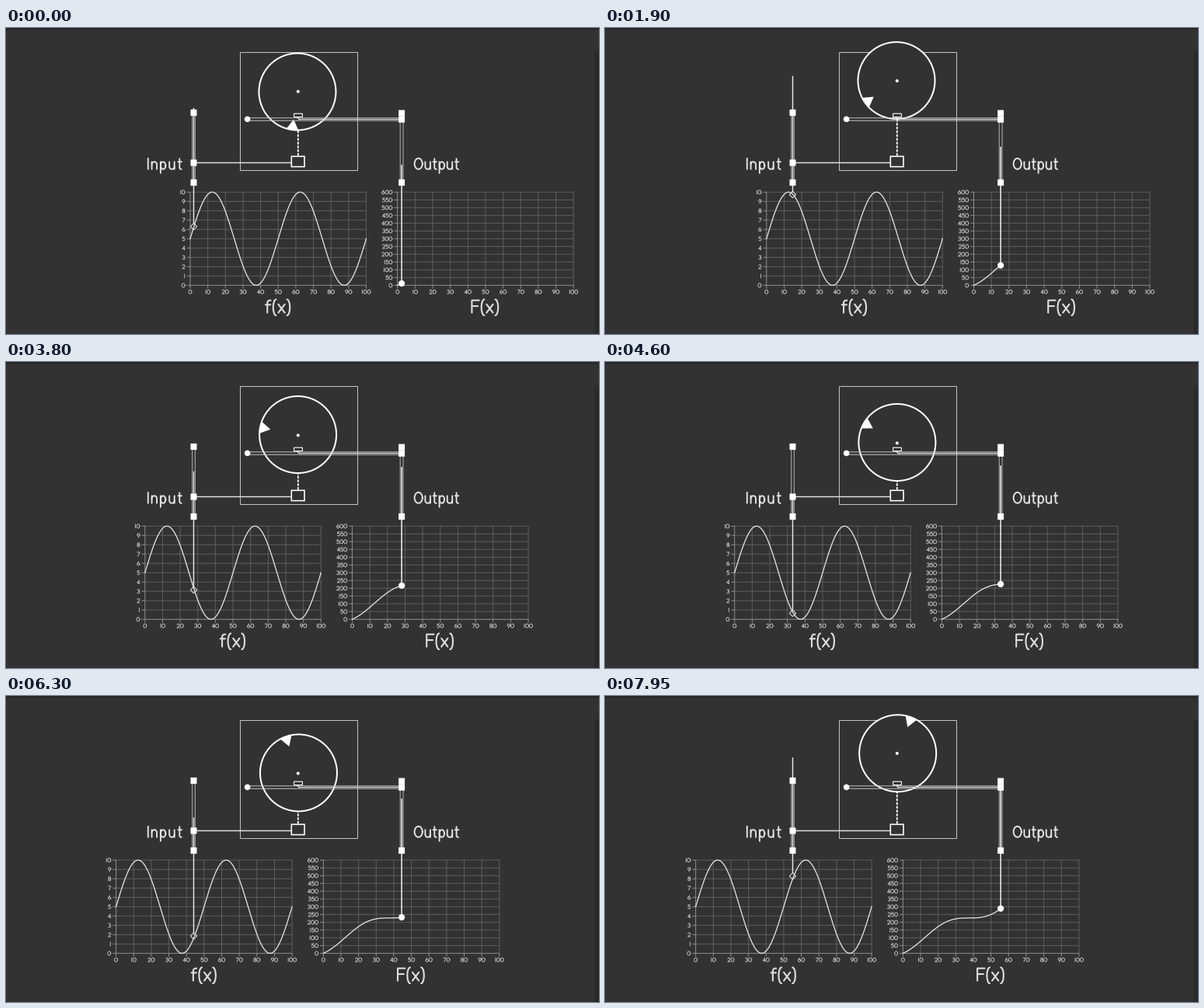
Recreate the animation shown at these times as a matplotlib script. Size 763 px wide and 394 px high, loop 8 s.

```python
import numpy as np
import matplotlib.pyplot as plt
from matplotlib.animation import FuncAnimation
from matplotlib.collections import LineCollection
from matplotlib.patches import Circle, Polygon, Rectangle
from matplotlib.transforms import Affine2D

W, H = 763, 394
PX = 0.72                      # one pixel in points at 100 dpi
BG = "#323232"
STEP = 50
FRAMES = 160

UNIT = 2.265                   # pixels per x unit
SPEED = 2.245                  # pixels the plots slide per x unit
TOP, BASE = 211.3, 331.3       # plot area
PEN_IN, PEN_OUT = 241.5, 509.1
IN_0, OUT_0 = 237.0, 503.7
ROD = 152
START_X = 2.1
HUB_X, RADIUS = 375.8, 49.5


# ---- single-stroke lettering, cap height 14 ----
def arc(cx, cy, rx, ry, a=0, b=360):
    t = np.radians(np.linspace(a, b, 20))
    return list(zip(cx + rx * np.cos(t), cy + ry * np.sin(t)))


GLYPHS = {
    "I": (0, [[(0, 0), (0, 14)]]),
    "n": (6.5, [[(0, 0), (0, 9.5)],
                arc(3.25, 6, 3.25, 3.5, 180, 0) + [(6.5, 0)]]),
    "p": (6.5, [[(0, 9.5), (0, -5)], arc(3.25, 4.75, 3.25, 4.75)]),
    "u": (6.5, [[(0, 9.5)] + arc(3.25, 3.5, 3.25, 3.5, 180, 360),
                [(6.5, 0), (6.5, 9.5)]]),
    "t": (4.5, [[(1.8, 13.5)] + arc(4, 2.2, 2.2, 2.2, 180, 275),
                [(0, 9.5), (4.5, 9.5)]]),
    "O": (10.2, [arc(5.1, 7, 5.1, 7)]),
    "f": (6, [[(2, 0)] + arc(5, 11, 3, 3, 180, 75), [(0, 9), (5.5, 9)]]),
    "x": (7.2, [[(0, 0), (7.2, 9.5)], [(0, 9.5), (7.2, 0)]]),
    "(": (3.2, [arc(3.2, 6, 3.2, 9, 90, 270)]),
    ")": (3.2, [arc(0, 6, 3.2, 9, 90, -90)]),
    "F": (8.2, [[(8.2, 14), (0, 14), (0, 0)], [(0, 7.5), (6.8, 7.5)]]),
    "0": (11, [arc(5.5, 7, 5.5, 7)]),
    "1": (3, [[(1.5, 0), (1.5, 14)]]),
    "2": (9, [arc(4.5, 9.8, 4.3, 4.2, 170, -35) + [(0, 0), (9, 0)]]),
    "3": (9, [arc(4.2, 10.6, 3.8, 3.4, 150, -90),
              arc(4.2, 3.7, 4.6, 3.6, 90, -150)]),
    "4": (9, [[(7, 0), (7, 14), (0, 4), (9, 4)]]),
    "5": (9, [[(8, 14), (1.5, 14)] + arc(4.3, 4.6, 4.6, 4.6, 135, -150)]),
    "6": (9, [arc(4.5, 4.4, 4.5, 4.4), [(0.6, 6.5), (5.5, 14)]]),
    "7": (9, [[(0, 14), (9, 14), (3, 0)]]),
    "8": (9, [arc(4.5, 10.6, 3.7, 3.4), arc(4.5, 3.7, 4.5, 3.6)]),
    "9": (9, [arc(4.5, 9.6, 4.5, 4.4), [(8.4, 7.5), (3.5, 0)]]),
}


def lettering(text, x, base, scale, gap, align=0.0):
    """Strokes for text; align 0 left, 0.5 centre, 1 right."""
    width = sum(GLYPHS[c][0] for c in text) + gap * (len(text) - 1)
    x -= align * width * scale
    strokes = []
    for c in text:
        w, lines = GLYPHS[c]
        strokes += [np.array(s) * (scale, -scale) + (x, base) for s in lines]
        x += (w + gap) * scale
    return strokes


# ---- stage ----
fig = plt.figure(figsize=(W / 100, H / 100), dpi=100, facecolor=BG)
ax = fig.add_axes([0, 0, 1, 1])
ax.set_xlim(0, W)
ax.set_ylim(H, 0)
ax.axis("off")

slide = Affine2D()
moving = slide + ax.transData


def strokes(lines, color, lw, z, scroll=False):
    c = LineCollection(lines, colors=color, linewidths=lw * PX, zorder=z,
                       capstyle="round", joinstyle="round", snap=False,
                       transform=moving if scroll else ax.transData)
    ax.add_collection(c, autolim=False)


def line(xs, ys, color, lw, z, **kw):
    return ax.plot(xs, ys, color=color, lw=lw * PX, zorder=z, snap=False,
                   scalex=False, scaley=False, **kw)[0]


def box(x0, y0, x1, y1, z, edge="none", fill="none", lw=0.0, snap=False):
    ax.add_patch(Rectangle((x0, y0), x1 - x0, y1 - y0, ec=edge, fc=fill,
                           lw=lw * PX, zorder=z, joinstyle="miter",
                           snap=snap))


def block(x, y):
    box(x - 4, y - 4.1, x + 4, y + 4.1, 12, fill="white")


def dot(x, y, r, z):
    return ax.add_patch(Circle((x, y), r, fc="white", ec="none", zorder=z))


# ---- functions ----
def f(x):
    return 5 + 5 * np.sin(2 * np.pi * x / 50)


def integral(x):
    return 5 * x + 125 / np.pi * (1 - np.cos(2 * np.pi * x / 50))


def y_in(x):
    return BASE - 12 * f(x)


def y_out(x):
    return BASE - integral(x) / 5


# ---- scrolling plots ----
def plot_area(x0, rows, row_step, title):
    right = x0 + 100 * UNIT
    xs = [x0 + 10 * k * UNIT for k in range(11)]
    ys = np.linspace(BASE, TOP, rows + 1)
    strokes([[(x, TOP), (x, BASE)] for x in xs[1:]]
            + [[(x0, y), (right, y)] for y in ys[1:]],
            "#5e5e5e", 1, 1, True)
    strokes([[(x0, TOP), (x0, BASE)], [(x0, BASE), (right, BASE)]]
            + [[(x, BASE), (x, BASE + 4)] for x in xs]
            + [[(x0 - 4, y), (x0, y)] for y in ys],
            "#8e8e8e", 1, 2, True)
    labels = []
    for k, x in enumerate(xs):
        labels += lettering(str(10 * k), x, 342.2, 0.36, 2.8, 0.5)
    for k, y in enumerate(ys):
        labels += lettering(str(row_step * k), x0 - 6.8, y + 2.6, 0.36, 2.8, 1)
    strokes(labels, "#c6c6c6", 0.9, 3, True)
    strokes(lettering(title, x0 + 112.6, 366.6, 1.14, 2.6, 0.5),
            "#dedede", 2.1, 3, True)


plot_area(IN_0, 10, 1, "f(x)")
plot_area(OUT_0, 12, 50, "F(x)")
u = np.linspace(0, 100, 301)
line(IN_0 + u * UNIT, y_in(u), "#e2e2e2", 1.3, 4, transform=moving)
trace = line([], [], "#e2e2e2", 1.3, 4, transform=moving)

# ---- page edges ----
for row, shade in enumerate(("#232323", "#2a2a2a", "#2f2f2f")):
    box(0, row, W, row + 1, 0, fill=shade)
box(757.5, 30, W, H, 0, fill="#2a2a2a")

# ---- fixed machine parts ----
strokes(lettering("Input", 182.8, 181.8, 1.0, 4.8), "#e4e4e4", 1.9, 5)
strokes(lettering("Output", 525.6, 181.8, 1.0, 3.6), "#e4e4e4", 1.9, 5)

box(301.2, 30.6, 451.8, 182.8, 5, edge="#c4c4c4", lw=1, snap=True)
line([HUB_X, HUB_X], [164.5, 117], "white", 1.8, 5, dashes=(1.9, 0.8),
     dash_capstyle="butt")
line([PEN_IN, 367], [173.5, 173.5], "#e0e0e0", 1.5, 5)
box(367.3, 165.3, 384, 178.6, 6, edge="white", fill=BG, lw=1.6)

strokes([[(PEN_IN - 1.8, 109), (PEN_IN - 1.8, 199)],
         [(PEN_IN + 1.8, 109), (PEN_IN + 1.8, 199)],
         [(PEN_OUT - 1.9, 118), (PEN_OUT - 1.9, 199)],
         [(PEN_OUT + 1.9, 118), (PEN_OUT + 1.9, 199)]], "#b4b4b4", 1, 9)
strokes([[(311, 115.8), (508, 115.8)], [(311, 119.3), (508, 119.3)]],
        "#c2c2c2", 1, 9)
line([377, 508], [117.5, 117.5], "#e6e6e6", 1.1, 9)
line([375, 378], [115.8, 118], "white", 1, 10)
box(370.6, 110.2, 381.4, 114.6, 10, edge="white", fill=BG, lw=1.1)
dot(310.6, 117.4, 3.8, 10)
for y in (109, 173.5, 199):
    block(PEN_IN, y)
for y in (109.7, 117.7, 199):
    block(PEN_OUT, y)

# ---- moving machine parts ----
disc = ax.add_patch(Circle((HUB_X, 80), RADIUS, fc=BG, ec="white",
                           lw=2 * PX, zorder=7))
wedge = ax.add_patch(Polygon(np.zeros((3, 2)), fc="white", ec="none",
                             zorder=8))
hub = dot(HUB_X, 80, 2, 8)
rod_in = line([], [], "#e4e4e4", 1.5, 10)
rod_out = line([], [], "#e8e8e8", 1.6, 10)
stylus = ax.add_patch(Polygon(np.zeros((4, 2)), fc="none", ec="#e8e8e8",
                              lw=PX, zorder=11))
bead = dot(PEN_OUT, BASE, 4.1, 11)

# time in seconds -> x under the pens, with one short stall
TIMES = [0, 2.95, 3.1, 3.15, 4.6, 5.5, 7.95]
XS = [START_X, 22.3, 22.3, 23.65, 33.4, 39.2, 55.7]


def draw(i):
    x = np.interp(i * STEP / 1000, TIMES, XS)
    slide.clear().translate((START_X - x) * SPEED, 0)

    v = np.linspace(0, x, 160)
    trace.set_data(OUT_0 + v * UNIT, y_out(v))

    yi, yo = y_in(x), y_out(x)
    rod_in.set_data([PEN_IN, PEN_IN], [yi - ROD, yi - 4])
    stylus.set_xy([(PEN_IN - 4.2, yi), (PEN_IN, yi - 4.2),
                   (PEN_IN + 4.2, yi), (PEN_IN, yi + 4.2)])
    rod_out.set_data([PEN_OUT, PEN_OUT], [yo - ROD, yo])
    bead.center = (PEN_OUT, yo)

    # disc turns once per 100 units and rides up with the input
    hub_y = 107 - 4 * f(x)
    a = np.radians(3.6 * x)
    wob = a - np.radians(25)
    hub.center = (HUB_X, hub_y)
    centre = np.array([HUB_X - 0.9 * np.cos(wob), hub_y - 0.9 * np.sin(wob)])
    disc.center = tuple(centre)
    out = np.array([-np.sin(a), np.cos(a)])
    side = np.array([np.cos(a), np.sin(a)])
    wedge.set_xy([centre + 36 * out, centre + 49 * out + 7.8 * side,
                  centre + 49 * out - 7.8 * side])
    return trace, rod_in, stylus, rod_out, bead, hub, disc, wedge


anim = FuncAnimation(fig, draw, frames=FRAMES, interval=STEP,
                     init_func=lambda: draw(0), repeat=True, repeat_delay=0,
                     blit=False)
plt.show()
```
